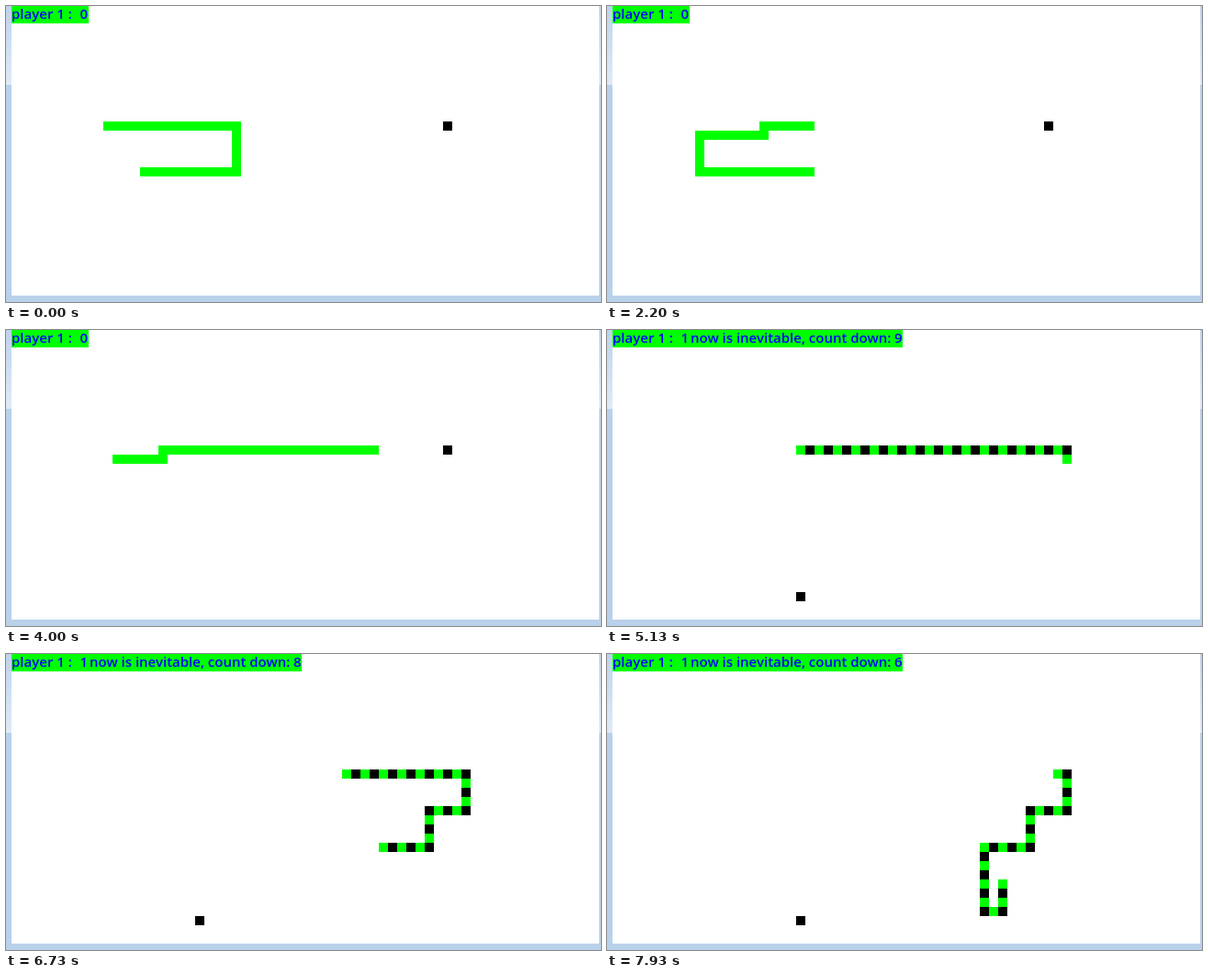
Write an HTML page that moves like this. It is 648 px wide and 323 px high and loops after 8000 ms.

```html
<!DOCTYPE html>
<html lang="en">
<head>
<meta charset="utf-8">
<title>Snake</title>
<style>
  html, body { margin: 0; width: 100%; height: 100%; overflow: hidden; }
  svg { display: block; width: 648px; height: 323px; }
  text { font: 600 15px "Open Sans", "DejaVu Sans", sans-serif; fill: #00f; white-space: pre; }
  rect, path { shape-rendering: crispEdges; }
</style>
</head>
<body>
<svg viewBox="0 0 648 323">
  <defs>
    <linearGradient id="glass" x1="0" y1="0" x2="0" y2="1">
      <stop offset="0" stop-color="#bdd3eb"/>
      <stop offset="1" stop-color="#e0eaf6"/>
    </linearGradient>
  </defs>
  <rect width="648" height="323" fill="#b9d1ea"/>
  <rect width="648" height="86" fill="url(#glass)"/>
  <rect x="6" width="640" height="316" fill="#fff"/>
  <path id="light" fill="#0f0"/>
  <path id="dark" fill="#000"/>
  <rect id="banner" x="6" height="19" fill="#0f0"/>
  <text x="6" y="14">player 1 :</text>
  <text id="score" x="89" y="14" text-anchor="end"></text>
  <g id="notice">
    <text x="91" y="14">now is inevitable, count down:</text>
    <text id="count" x="321.5" y="14" text-anchor="end"></text>
  </g>
</svg>
<script>
const LOOP = 8000, CELL = 10, LENGTH = 30, EAT_STEP = 48;
const ROUTE = "R14 D5 L15 U4 R7 U1 R33 D4 L4 D4 L5 D7 R2 U3";
const DIRECTIONS = { R: [1, 0], L: [-1, 0], D: [0, 1], U: [0, -1] };
const el = id => document.getElementById(id);

function trace(route, x, y) {
  const cells = [[x, y]];
  for (const leg of route.split(" ")) {
    const [dx, dy] = DIRECTIONS[leg[0]];
    for (let i = 0; i < +leg.slice(1); i++) {
      x += dx * CELL;
      y += dy * CELL;
      cells.push([x, y]);
    }
  }
  return cells;
}

const trail = trace(ROUTE, 106, 126);
const square = ([x, y]) => `M${x} ${y}h${CELL}v${CELL}h${-CELL}z`;
const draw = (id, cells) => el(id).setAttribute("d", cells.map(square).join(""));

// Ticks alternate between 130 ms and 70 ms.
const stepAt = t => 2 * Math.floor(t / 200) + (t % 200 >= 130 ? 1 : 0);

function render(step) {
  const eaten = step >= EAT_STEP;
  const head = step + LENGTH - 1;
  const tail = eaten ? step - 1 : step;
  const light = [], dark = [eaten ? [206, 286] : [476, 126]];
  for (let i = head; i >= tail; i--) {
    (eaten && (head - i) % 2 ? dark : light).push(trail[i]);
  }
  draw("light", light);
  draw("dark", dark);
  el("banner").setAttribute("width", eaten ? 316 : 84);
  el("score").textContent = eaten ? 1 : 0;
  el("notice").setAttribute("visibility", eaten ? "visible" : "hidden");
  el("count").textContent = 9 - Math.floor((step - EAT_STEP) / 10);
}

const start = performance.now();
let shown = -1;
function tick() {
  const step = stepAt((performance.now() - start) % LOOP);
  if (step !== shown) render(shown = step);
  requestAnimationFrame(tick);
}
tick();
</script>
</body>
</html>
```
